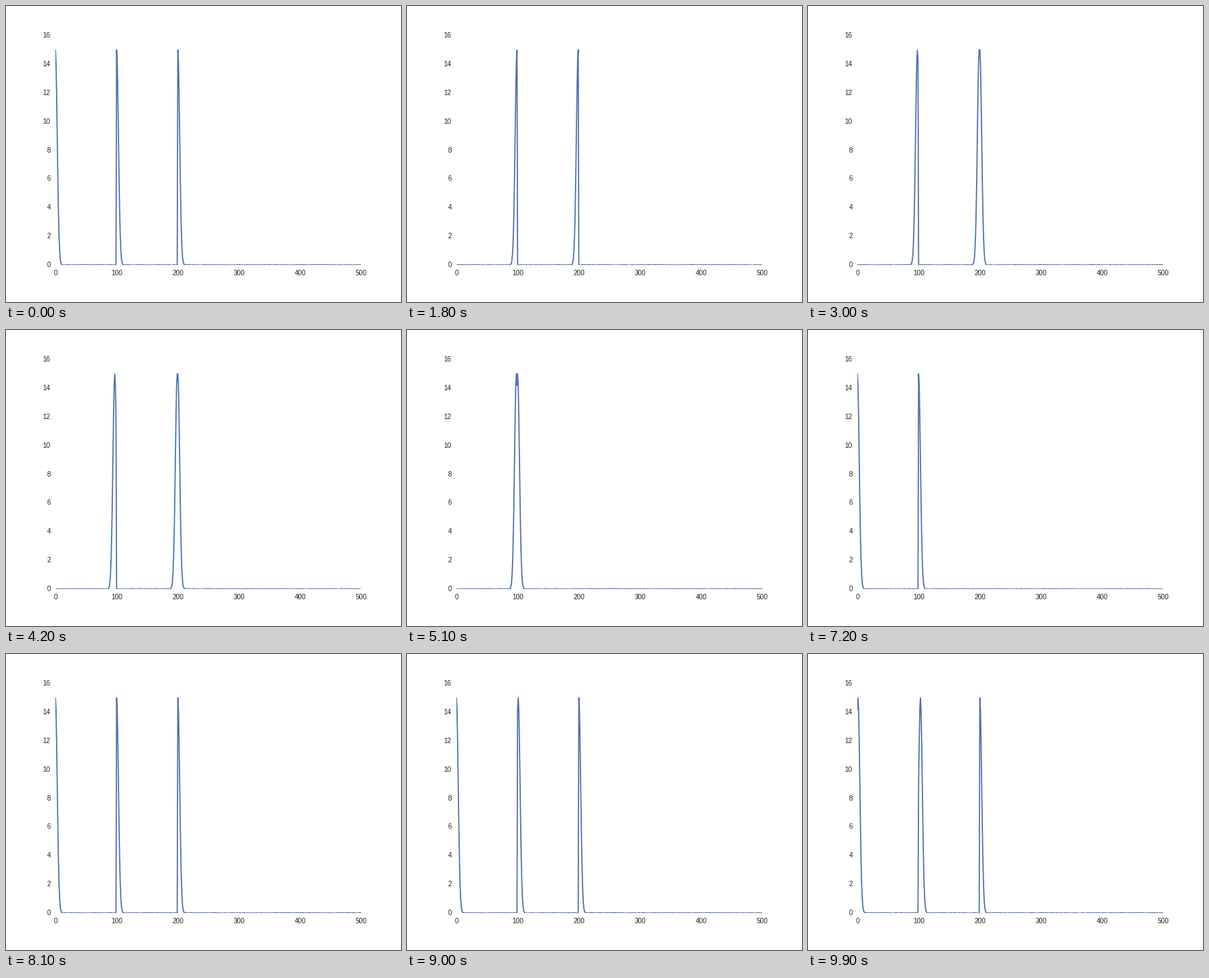
A matplotlib script that plays this animation: 576 px wide and 432 px high, repeating every 10 s.

```python
import numpy as np
import matplotlib.pyplot as plt
from matplotlib.animation import FuncAnimation

FRAMES, INTERVAL = 100, 100
CELLS, RING = 500, 100
PEAK, WIDTH, NOISE = 15, 3, 0.01

# Slow drift of two coordinates around a ring, sampled at a few moments
KEYS = [0, 18, 42, 60, 72, 90, 99]
DRIFT_A = [0, -1, -3, -1, 0, 0, 1]
DRIFT_B = [0, -1, -1, 0, 0, 1, 3]
TOGGLES = [9, 30, 51, 81]  # the third bump switches off, on, off, on

plt.rcParams.update({
    "font.family": "Liberation Sans",
    "font.size": 10,
    "text.color": "#262626",
    "xtick.color": "#262626",
    "ytick.color": "#262626",
})

fig, ax = plt.subplots(figsize=(8, 6), dpi=72, facecolor="white")
fig.subplots_adjust(left=0.125, right=0.9, bottom=0.125, top=0.9)
ax.set(xlim=(0, CELLS), ylim=(0, 16),
       xticks=range(0, 501, 100), yticks=range(0, 17, 2))
ax.tick_params(length=0, pad=7)
for label in ax.get_yticklabels():
    label.set_va("center")
for spine in ax.spines.values():
    spine.set_visible(False)

cells = np.arange(CELLS)
line, = ax.plot([], [], color="#4C72B0", lw=1.75, solid_capstyle="round")


def bump(size, center):
    return PEAK * np.exp(-(np.arange(size) - center) ** 2 / (2 * WIDTH ** 2))


def ring_pos(frame, drift):
    return int(np.rint(np.interp(frame, KEYS, drift))) % RING


def activity(frame):
    rates = np.random.default_rng(frame).normal(0, NOISE, CELLS)
    rates[:RING] += bump(RING, ring_pos(frame, DRIFT_A))
    rates[RING:2 * RING] += bump(RING, ring_pos(frame, DRIFT_B))
    if np.searchsorted(TOGGLES, frame, side="right") % 2 == 0:
        rates[2 * RING:] += bump(CELLS - 2 * RING, 0)
    return rates


def draw(frame):
    line.set_data(cells, activity(frame))
    return line,


anim = FuncAnimation(fig, draw, frames=FRAMES, interval=INTERVAL,
                     repeat=True, repeat_delay=0)
plt.show()
```
